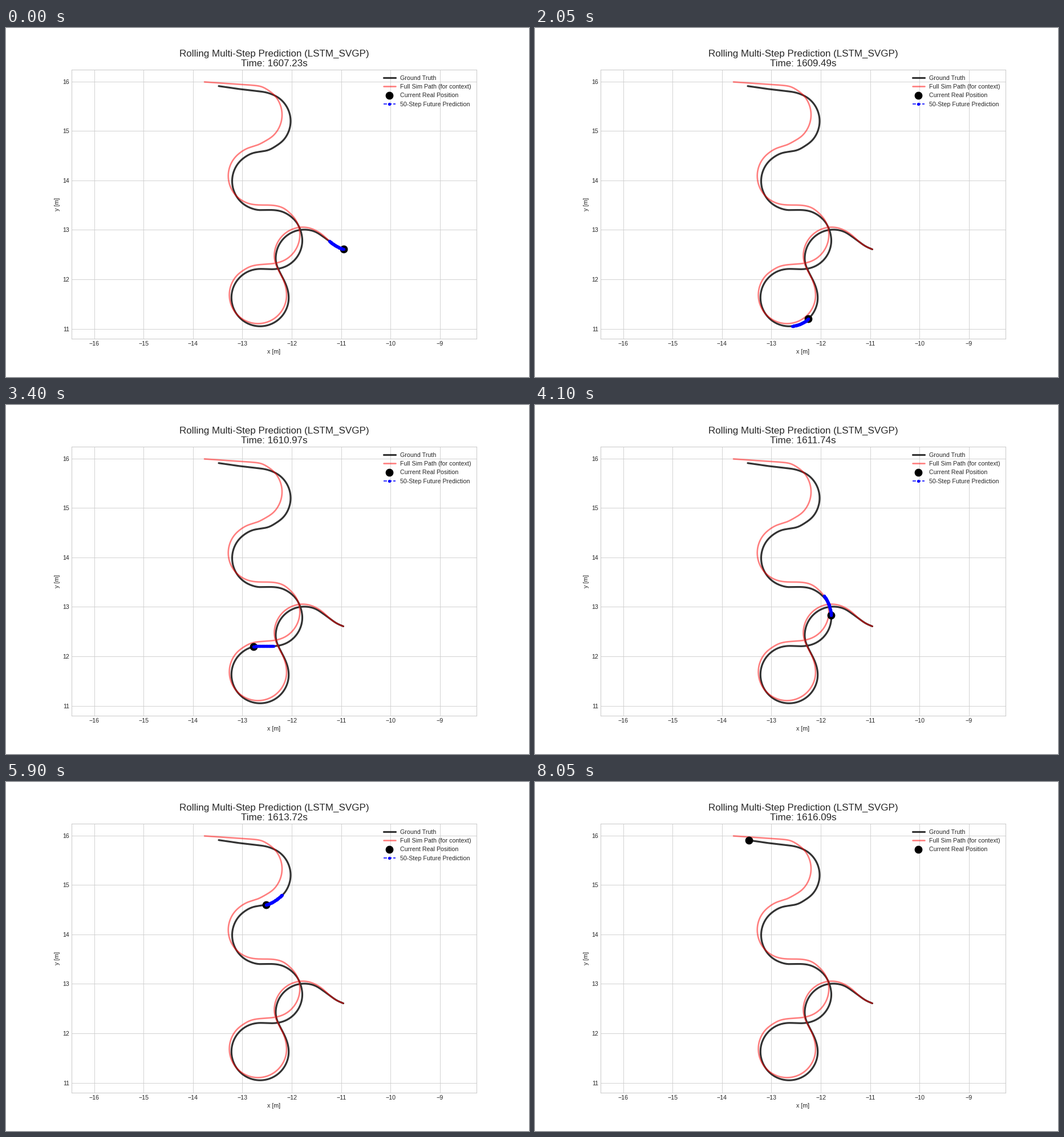
A matplotlib script for the animation above (8.1 s loop, 917x611 px).

```python
import numpy as np
import matplotlib.pyplot as plt
from matplotlib.animation import FuncAnimation

plt.style.use("seaborn-v0_8-whitegrid")
plt.rcParams["font.family"] = "Liberation Sans"

FRAMES, INTERVAL = 162, 50
T0, DT = 1607.232, 0.055
HORIZON = 50
LAST_PREDICTION = 156
SCALE = 86.59               # pixels per metre
LEFT, TOP = 114.625, 73.32  # axes corner on the stage
X0, Y1 = -16.463, 16.234    # the same corner in metres


def metres(p):
    p = np.asarray(p, float)
    return X0 + (p[..., 0] - LEFT) / SCALE, Y1 - (p[..., 1] - TOP) / SCALE


def arc(cx, cy, r, a0, a1):
    """Points on a circle; degrees, clockwise on screen."""
    a = np.radians(np.linspace(a0, a1, round(abs(a1 - a0) / 18) + 1))
    return np.column_stack([cx + r * np.cos(a), cy + r * np.sin(a)])


def arc_length(p):
    return np.r_[0, np.cumsum(np.hypot(*np.diff(p, axis=0).T))]


def spline(*parts, n=2400):
    """Natural cubic spline through all parts, by chord length."""
    p = np.vstack(parts)
    t = arc_length(p)
    h = np.diff(t)
    m = np.eye(len(p))
    rhs = np.zeros_like(p)
    slope = np.diff(p, axis=0) / h[:, None]
    for i in range(1, len(p) - 1):
        m[i, i - 1:i + 2] = h[i - 1], 2 * (h[i - 1] + h[i]), h[i]
        rhs[i] = 6 * (slope[i] - slope[i - 1])
    c = np.linalg.solve(m, rhs)
    u = np.linspace(0, t[-1], n)
    k = np.clip(np.searchsorted(t, u, side="right") - 1, 0, len(h) - 1)
    d, hk = (u - t[k])[:, None], h[k][:, None]
    b = slope[k] - hk * (2 * c[k] + c[k + 1]) / 6
    return p[k] + d * b + d**2 * c[k] / 2 + d**3 * (c[k + 1] - c[k]) / (6 * hk)


truth = spline(
    [(591.5, 387.5), (580, 382.3), (567, 373.3)],
    arc(523, 403, 50, -50, -188),
    [(477, 421), (482.5, 432), (489, 445)],
    arc(445.5, 472, 50.2, -14, 268),
    [(459, 422.2)],
    arc(469.5, 372, 50, 83, -18),
    [(509.5, 340.5), (498, 329), (484, 321.5), (470, 318.8), (455, 318.7), (441, 318.4)],
    arc(447, 268, 50.5, 108, 238),
    [(432, 219.3), (446, 216.5), (461, 213.3)],
    arc(449, 163, 50, 62, -70),
    [(455, 112.6), (443, 110.8), (428, 109.2), (410, 107), (390, 104.1), (373, 101.7)],
)
sim = spline(
    [(591.5, 387.5), (580, 382.3), (567, 373), (556, 363), (545, 355.5), (533, 350.5)],
    arc(520.5, 398.7, 50, -90, -185),
    [(472.3, 411), (476.3, 421), (482, 432), (487.8, 445)],
    arc(441.8, 467.3, 50.2, -10, 240),
    [(428, 417.8), (442, 414.6), (457, 413.4)],
    arc(465, 362, 50.2, 80, -50),
    [(486, 315.2), (474, 311.3), (458, 310), (441, 309.7)],
    arc(440, 259, 50.3, 108, 235),
    [(425, 210), (440, 205.2)],
    arc(433.5, 152, 50.5, 65, -60),
    [(448, 102.8), (436, 100.6), (415, 99), (380, 96.6), (348, 94.5)],
)

dist = arc_length(truth)


def at(s):
    return np.column_stack([np.interp(s, dist, truth[:, i]) for i in (0, 1)])


def travelled(x, y):
    return dist[np.argmin(np.hypot(truth[:, 0] - x, truth[:, 1] - y))]


# Where the robot is at key frames; it brakes to a stop at the end
KEYS = {
    0: (591.5, 387.5), 25: (473.5, 411.5), 53: (407, 504.5), 68: (434, 423.3),
    82: (520, 368.5), 85: (512, 344), 102: (404.5, 295.5), 119: (463, 213),
    133: (477.5, 122.5), 141: (421, 108.4), 145: (396.5, 105), 149: (381, 102.8),
    154: (375, 102),
}
key_dist = [travelled(*p) for p in KEYS.values()]

# Reach and sideways drift of the prediction, in pixels
REACH = {0: 29, 25: 33, 53: 28, 82: 38, 102: 32, 133: 36, 141: 34, 149: 13, 154: 3}
DRIFT = {0: 0, 25: -1.5, 53: 0, 82: 2.5, 102: -2, 133: 0}


def keyed(n, table):
    return np.interp(n, list(table), list(table.values()))


def predict(n, s):
    u = np.linspace(0, 1, HORIZON)
    p = at(s + u * keyed(n, REACH))
    p[:, 0] += keyed(n, DRIFT) * u**2
    return p


fig, ax = plt.subplots(figsize=(12.0027, 7.9974), dpi=76.4)
ax.set_xlim(X0, X0 + 710.675 / SCALE)
ax.set_ylim(Y1 - 470.47 / SCALE, Y1)
ax.set_xlabel("x [m]")
ax.set_ylabel("y [m]")

lines = [
    ax.plot(*metres(truth), "k-", lw=3, alpha=0.8, label="Ground Truth")[0],
    ax.plot(*metres(sim), "r-", lw=2.5, alpha=0.5, label="Full Sim Path (for context)")[0],
    ax.plot([], [], "ko", ms=12, label="Current Real Position")[0],
    ax.plot([], [], "bo--", ms=4, lw=1.5, label="50-Step Future Prediction")[0],
]
robot, future = lines[2:]


def update(n):
    s = np.interp(n, list(KEYS), key_dist)
    robot.set_data(*metres(at([s])))
    shown = n <= LAST_PREDICTION
    future.set_data(*(metres(predict(n, s)) if shown else ([], [])))
    ax.legend(handles=lines if shown else lines[:3], loc="upper right")
    ax.set_title("Rolling Multi-Step Prediction (LSTM_SVGP)\n"
                 f"Time: {T0 + DT * n:.2f}s", fontsize=16)
    return lines


anim = FuncAnimation(fig, update, frames=FRAMES, interval=INTERVAL,
                     init_func=lambda: update(0), repeat=True, blit=False)
plt.show()
```
